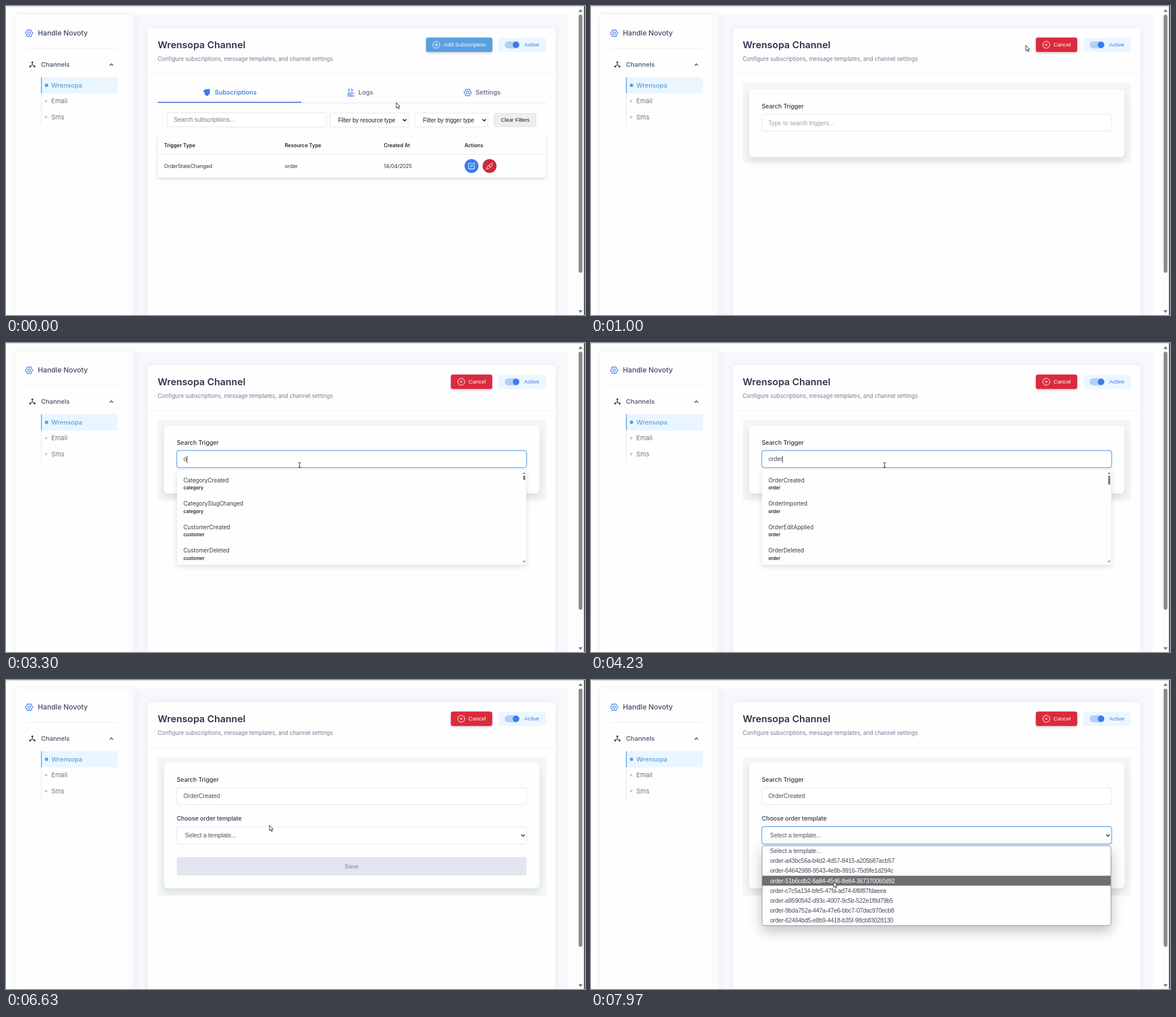
These frames come from a looping animation (1000 px wide and 534 px high, 8 s). An HTML page:

```html
<!DOCTYPE html>
<html lang="en">
<head>
<meta charset="utf-8">
<title>Channel subscriptions</title>
<style>
html, body { margin: 0; width: 100%; height: 100%; overflow: hidden; background: #fefeff; }
svg { display: block; width: 100vw; height: 100vh; }
text { font-family: Inter, sans-serif; white-space: pre; }
text.a { font-family: "Liberation Sans", Arial, sans-serif; }
.soft { filter: drop-shadow(0 0 5px rgba(60, 60, 100, .09)); }
.low { filter: drop-shadow(0 2px 2px rgba(0, 0, 0, .16)); }
.lift { filter: drop-shadow(0 6px 7px rgba(30, 50, 70, .13)); }
.menu { filter: drop-shadow(0 3px 4px rgba(0, 0, 0, .11)); }
.pop { filter: drop-shadow(0 9px 11px rgba(0, 0, 0, .24)); }
</style>
</head>
<body>
<svg id="stage" viewBox="0 0 1000 534" preserveAspectRatio="none"></svg>
<script>
const LOOP = 8000;
const OPEN_FORM = 650, FOCUS = 2230, PICK = 6300, OPEN_SELECT = 7240;
const KEYS = [3250, 3480, 3690, 3880, 4090];
const WORD = 'order';
const BLUE = '#3b7ced', SKY = '#5a9fe0', RED = '#db2a3e', DARK = '#2d3548', GREY = '#6b7488';

// cursor hot spot: time, x, y
const PATH = [
  [0, 674, 167], [80, 674, 167], [560, 757, 66], [800, 751, 68], [1080, 751, 68],
  [1660, 513, 202], [1950, 507, 211], [4350, 507, 211], [4950, 456, 249],
  [6750, 455, 251], [7120, 424, 267], [7440, 424, 267], [7900, 419, 349], [LOOP, 419, 349]
];
const ALL = ['CategoryCreated', 'CategorySlugChanged', 'CustomerCreated', 'CustomerDeleted'];
const ORDERS = ['OrderCreated', 'OrderImported', 'OrderEditApplied', 'OrderDeleted'];
const MIXED = ALL.slice(0, 2).concat(ORDERS.slice(0, 2));
const OPTIONS = ['Select a template...',
  'order-a43bc56a-b4d2-4d57-8415-a205b87acb57', 'order-64642988-9543-4e8b-9916-75d9fe1d294c',
  'order-51b6cdb2-6a84-45d6-8e64-367370060d92', 'order-c7c5a134-bfe5-47fa-ad74-6f6f87fdaeea',
  'order-a9590542-d93c-4007-9c5b-522e1f8d79b5', 'order-9bda752a-447a-47e6-bbc7-07dac970ecb8',
  'order-62464bd5-e8b9-4418-b35f-98cb83028130'];
const ROW = 40.4, ROW_TOP = 223.4, OPT = 17.1, OPT_TOP = 287;

const rect = (x, y, w, h, fill, rx = 0, more = '') =>
  `<rect x="${x}" y="${y}" width="${w}" height="${h}" rx="${rx}" fill="${fill}" ${more}/>`;
const circle = (x, y, r, fill, more = '') =>
  `<circle cx="${x}" cy="${y}" r="${r}" fill="${fill}" ${more}/>`;
const line = (d, color, w = 1, more = '') =>
  `<path d="${d}" fill="none" stroke="${color}" stroke-width="${w}" stroke-linecap="round" stroke-linejoin="round" ${more}/>`;
const fillPath = (d, color, more = '') => `<path d="${d}" fill="${color}" ${more}/>`;
const text = (x, y, s, size, fill, weight = 400, more = '') =>
  `<text x="${x}" y="${y}" font-size="${size}" fill="${fill}" font-weight="${weight}" ${more}>${s}</text>`;
const arial = (x, y, s, size, fill, weight = 400, more = '') =>
  text(x, y, s, size, fill, weight, `class="a" ${more}`);
const group = (id, body, more = '') => `<g id="${id}" ${more}>${body}</g>`;
const box = (x, y, w, h, rx = 3, more = '') =>
  rect(x, y, w, h, '#fff', rx, `stroke="#e3e6ee" ${more}`);
const chevron = (x, y, w = 1.4) => line(`M${x - 2.6} ${y - 1.3}l2.6 2.6 2.6 -2.6`, '#222', w);
const tri = (x, y, s, dir, color) =>
  fillPath(`M${x - s} ${y + dir * s * .6}h${2 * s}l${-s} ${-dir * s * 1.3}z`, color);

function gear(x, y, r, color) {
  let d = '';
  for (let i = 0; i < 6; i++) {
    [[-.3, .78], [-.2, 1], [.2, 1], [.3, .78]].forEach(([o, k]) => {
      const a = (i + .5 + o) * Math.PI / 3;
      d += `${d ? 'L' : 'M'}${(x + Math.sin(a) * r * k).toFixed(2)} ${(y - Math.cos(a) * r * k).toFixed(2)}`;
    });
  }
  return line(d + 'Z', color, 1.1) + circle(x, y, r * .34, 'none', `stroke="${color}" stroke-width="1.1"`);
}

function shell() {
  return rect(0, 0, 1000, 534, '#fefeff')
    + rect(224, 15, 747, 519, '#f8f8fc')
    + rect(16, 15, 207, 540, '#fefeff', 3, 'class="soft"')
    + rect(210, 15, 14, 519, 'url(#edge)')
    + rect(0, 0, 1000, 2.5, 'url(#top)')
    + gear(40, 47, 6.4, BLUE)
    + text(55, 51.4, 'Handle Novoty', 12.2, '#414a5e', 500)
    + rect(33, 72.5, 161, 1, '#eeeff4')
    + line('M45.5 97.5V101.5L41.5 104.5M45.5 101.5L49.5 104.5', '#3f4654', 1.2)
    + circle(45.5, 97.4, 1.7, '#3f4654') + circle(41.7, 104.5, 1.7, '#3f4654') + circle(49.3, 104.5, 1.7, '#3f4654')
    + text(60.5, 105, 'Channels', 11, '#4a5266', 500)
    + line('M179.4 102.6l2.6 -2.6 2.6 2.6', '#333a48', 1.3)
    + rect(60.5, 151, 1, 55, '#e2e4ea')
    + rect(61, 123, 132, 28, '#eaf6ff') + rect(60.5, 123, 1.4, 28, SKY)
    + circle(70, 137, 2.9, SKY) + text(78.3, 141, 'Wrensopa', 11, SKY, 500)
    + circle(69.3, 164.5, 2.2, '#c9ccd6') + text(78.3, 168.2, 'Email', 11, GREY)
    + circle(69.3, 192, 2.2, '#c9ccd6') + text(78.3, 195.9, 'Sms', 11, GREY)
    + rect(245, 38, 704, 520, '#fefeff', 6, 'class="soft"')
    + text(262, 72.8, 'Wrensopa Channel', 16.5, DARK, 600)
    + text(262, 95.4, 'Configure subscriptions, message templates, and channel settings', 9.63, '#737c90')
    + rect(245, 116, 704, 1, '#f1f1f5')
    + rect(850, 55, 82.5, 24.5, '#ecf6fe', 4)
    + rect(861.5, 61, 25.5, 12.3, '#b4d0f5', 6.15) + circle(880.8, 67.1, 5.6, BLUE)
    + arial(895, 70.4, 'Active', 9.63, BLUE)
    + rect(987, 2, 11, 532, '#fcfcfc') + rect(989, 15, 6.6, 446, '#8b8b8b', 3.3)
    + tri(992.3, 8, 3.6, 1, '#757575') + tri(992.3, 528, 3.6, -1, '#757575')
    + rect(998.2, 0, 1.8, 534, '#4c4c4e');
}

function tableView() {
  const add = rect(725.5, 54.5, 114.5, 25, SKY, 3.5, 'class="low"')
    + circle(743.3, 67, 6, 'none', 'stroke="#fff" stroke-width="1"')
    + line('M740.6 67h5.4M743.3 64.3v5.4', '#fff')
    + arial(756, 70.4, 'Add Subscription', 9.63, '#fff');
  const tabs = rect(262, 167, 670.5, 1, '#e3e5eb') + rect(262, 165.6, 248, 1.7, '#3b76d9')
    + fillPath('M340.5 147.5q3 -4.5 8 -3.6l3.2 -.8.4 4.2q.8 4.4 -2.4 6.2l-1.4 2.6 -3 -1.6q-2.8 -1 -2.2 -4.4z', BLUE)
    + text(360.5, 153.4, 'Subscriptions', 11, '#3573dc', 500)
    + line('M593.2 143.6l-2 1.8 2 1.8M596.6 143.6l2 1.8 -2 1.8', BLUE, 1.3)
    + line('M590.4 150.3h10.4M590.4 152.9h7.6M590.4 155.5h10.4', BLUE, 1.3)
    + text(608.7, 153.4, 'Logs', 11, '#5d6679', 500)
    + gear(797.4, 149.6, 6.4, BLUE) + text(811, 153.4, 'Settings', 11, '#5d6679', 500);
  const filters = box(278.5, 184.5, 275, 24.5, 2)
    + arial(289.5, 200.4, 'Search subscriptions...', 10.45, '#757a85')
    + box(559.5, 185, 135, 24, 2) + arial(573.5, 200.5, 'Filter by resource type', 10, '#1d1f24') + chevron(688.5, 197.3, 1.6)
    + box(706.5, 185, 125.5, 24, 2) + arial(720.3, 200.5, 'Filter by trigger type', 10, '#1d1f24') + chevron(826, 197.3, 1.6)
    + rect(843.5, 185.5, 72, 23, '#eeeef0', 2.5, 'stroke="#e2e3e8"')
    + arial(855, 200.2, 'Clear Filters', 9.15, '#1d1f24');
  const cols = [[273, 'Trigger Type', 'OrderStateChanged'], [481.5, 'Resource Type', 'order'],
    [652.5, 'Created At', '14/04/2025'], [792, 'Actions', '']];
  const table = rect(262, 226, 670.5, 71, '#fefeff', 4, 'class="low"')
    + rect(262, 256, 670.5, 1, '#e9ebf0')
    + cols.map(([x, head, cell]) => text(x, 243.8, head, 8.75, '#23272f', 600) + text(x, 280.2, cell, 8.85, '#2c313b')).join('')
    + circle(804, 276.5, 12, BLUE) + circle(835.2, 276.5, 12, '#ce2a3b')
    + line('M804 271.8h-2.8q-2.2 0 -2.2 2.2v5.4q0 2.2 2.2 2.2h5.4q2.2 0 2.2 -2.2v-2.8', '#fff', 1.1)
    + line('M803 277.6l.5 -2.2 4.9 -4.9 1.7 1.7 -4.9 4.9z', '#fff', 1)
    + line('M834 275.5l3 3 2.2 -2.2q1 -1.6 -.3 -2.8t-2.8 -.3zM833 276l-2 2q-1.4 1.6 0 3t3 0l2 -2zM839.4 272.6l1.8 -1.8M830.8 281l-1.8 1.8', '#fff', 1);
  return group('table', add + tabs + filters + table);
}

function formView() {
  const cancel = rect(768.3, 54.5, 71.5, 25, RED, 3.5, 'class="low"')
    + circle(786.3, 67, 6, 'none', 'stroke="#fff" stroke-width="1"')
    + line('M784.4 65.1l3.8 3.8M788.2 65.1l-3.8 3.8', '#fff')
    + arial(798.7, 70.4, 'Cancel', 9.63, '#fff');
  const input = text(295, 176, 'Search Trigger', 10.25, '#2f3747', 500)
    + rect(293.5, 184.5, 607, 32, '#cfe2fb', 5, 'id="glow"')
    + box(295, 186, 604, 29.3, 4, 'id="field"')
    + arial(306.5, 204.3, 'Type to search triggers...', 10.3, '#9ba1ae', 400, 'id="hint"')
    + arial(306.5, 204.3, '', 10.3, '#454c59', 400, 'id="typed"')
    + rect(306.3, 195, .9, 12, '#222', 0, 'id="caret"');
  const chooser = text(295, 243.2, 'Choose order template', 10.25, '#2f3747', 500)
    + rect(293.5, 252, 607, 33, '#cfe2fb', 5, 'id="selGlow"')
    + box(295, 253.5, 604, 29.8, 4, 'id="select"')
    + arial(309.3, 272.3, OPTIONS[0], 10.3, '#4b5260') + chevron(893, 268.8)
    + rect(295, 306, 604, 32, '#e2e7ef', 4)
    + arial(597, 325.5, 'Save', 10.4, '#9aa3b4', 700, 'text-anchor="middle"');
  return group('form', cancel
    + rect(262, 133, 670.5, 139, '#f4f7f8', 3, 'id="back"')
    + group('card', rect(273, 142.6, 648.3, 117.4, '#fefeff', 7, 'id="panel" class="lift"')
      + input + group('chooser', chooser)));
}

function listView() {
  let rows = '';
  for (let i = 0; i < 4; i++) {
    rows += text(306.5, 240.7 + i * ROW, '', 9.63, '#333a47', 400, `id="name${i}"`)
      + text(306.5, 253.3 + i * ROW, '', 7.95, '#23272f', 600, `id="kind${i}"`);
  }
  return group('list', rect(295.3, 218.5, 603.4, 165, '#fefeff', 3, 'class="menu" stroke="#ebedf1" stroke-width=".8"')
    + rect(296, ROW_TOP, 595, ROW, '#f6f7f9', 0, 'id="hover"') + rows
    + tri(895, 224.8, 2.3, 1, '#777') + tri(895, 378, 2.3, -1, '#777')
    + rect(893, 229, 4, 8, '#858585', 2, 'id="thumb"'));
}

function popupView() {
  const items = OPTIONS.map((s, i) => arial(309.3, 299.2 + i * OPT, s, 10.3, '#444b58', 400,
    `id="opt${i}" letter-spacing="${i ? -.2 : .03}"`)).join('');
  return group('popup', rect(295.4, 286.4, 602.6, 138, '#fefeff', 4, 'class="pop" stroke="#85888e" stroke-width=".9"')
    + rect(295.8, OPT_TOP, 601.8, OPT, '#6f6f71', 0, 'id="mark"') + items);
}

function cursors() {
  const ink = 'stroke="#222" stroke-width=".9" stroke-linejoin="round"';
  return group('arrow', fillPath('M0 0V9.4L2.2 7.4 3.7 10.8 5.2 10.1 3.7 6.9H6.6Z', '#fff', ink))
    + group('beam', line('M-2 -4.3Q0 -4.3 0 -3.2Q0 -4.3 2 -4.3M0 -3.2V3.2M-2 4.3Q0 4.3 0 3.2Q0 4.3 2 4.3', '#222', 1))
    + group('hand', fillPath('M-1.2 .6Q0 -1 1.1 .6V4.2Q2.3 3.4 3 4.6Q4.2 4 4.7 5.2Q5.6 5 5.6 6.2V8.6Q5.4 10.4 4.3 12H-.6Q-1.4 10.2 -3.6 7.6Q-3.8 6 -2.2 6.4L-1.2 7.2Z', '#fff', ink));
}

document.getElementById('stage').innerHTML =
  '<defs><linearGradient id="edge"><stop stop-color="#f8f8fb"/><stop offset=".25" stop-color="#fdfdfe"/><stop offset="1" stop-color="#f3f3f8"/></linearGradient>'
  + '<linearGradient id="top" x2="0" y2="1"><stop stop-color="#d6d6da"/><stop offset="1" stop-color="#fefeff"/></linearGradient></defs>'
  + shell() + tableView() + formView() + listView() + popupView() + cursors();

const el = {};
document.querySelectorAll('[id]').forEach(n => { el[n.id] = n; });
const set = (id, key, value) => el[id].setAttribute(key, value);
const show = (id, on) => set(id, 'visibility', on ? 'inherit' : 'hidden');
const write = (id, s) => { if (el[id].textContent !== s) el[id].textContent = s; };
const ramp = (t, a, b) => {
  const p = Math.min(1, Math.max(0, (t - a) / (b - a)));
  return p * p * (3 - 2 * p);
};
const mix = (a, b, p) => `rgb(${a.map((v, i) => Math.round(v + (b[i] - v) * p))})`;

function pointer(t) {
  const i = Math.max(1, PATH.findIndex(k => k[0] > t));
  const [a, ax, ay] = PATH[i - 1], [b, bx, by] = PATH[i];
  const p = ramp(t, a, b);
  return [ax + (bx - ax) * p, ay + (by - ay) * p];
}

function focusRing(field, glow, p) {
  set(field, 'stroke', mix([227, 230, 238], [95, 157, 230], p));
  set(glow, 'opacity', p);
}

function drawList(t, y, count) {
  const open = t >= FOCUS && t < PICK;
  const names = count > 2 ? ORDERS : count === 2 ? MIXED : ALL;
  const over = open && y >= ROW_TOP;
  show('list', open);
  show('hover', over);
  set('hover', 'y', ROW_TOP + Math.floor((y - ROW_TOP) / ROW) * ROW);
  set('thumb', 'height', count > 2 ? 16 : count === 2 ? 12 : 8);
  names.forEach((s, i) => {
    write('name' + i, s);
    write('kind' + i, s.match(/^[A-Z][a-z]+/)[0].toLowerCase());
  });
  return over;
}

function drawPopup(t, y) {
  const at = Math.max(0, Math.floor((y - OPT_TOP) / OPT));
  show('popup', t >= OPEN_SELECT);
  set('mark', 'y', OPT_TOP + at * OPT);
  OPTIONS.forEach((s, i) => set('opt' + i, 'fill', i === at ? '#fff' : '#444b58'));
}

function draw(t) {
  const [x, y] = pointer(t);
  const form = t >= OPEN_FORM, picked = t >= PICK;
  const count = KEYS.filter(k => t >= k).length;
  show('table', !form);
  show('form', form);
  show('chooser', picked);
  set('card', 'transform', `translate(0 ${1.3 * (1 - ramp(t, 1400, 1690))})`);
  set('back', 'height', picked ? 240 : 139);
  set('panel', 'height', picked ? 217.4 : 117.4);

  const typed = picked ? ORDERS[0] : WORD.slice(0, count);
  write('typed', typed);
  show('hint', !typed);
  const since = t - (count ? KEYS[count - 1] : FOCUS);
  show('caret', form && t >= FOCUS && !picked && Math.floor(since / 530) % 2 === 0);
  set('caret', 'x', 306.3 + (typed ? el.typed.getComputedTextLength() : 0));
  focusRing('field', 'glow', ramp(t, FOCUS, FOCUS + 250) * (1 - ramp(t, PICK, PICK + 200)));
  focusRing('select', 'selGlow', ramp(t, OPEN_SELECT, OPEN_SELECT + 200));

  const overRow = drawList(t, y, count);
  drawPopup(t, y);

  const overAdd = !form && x > 725 && y > 54 && y < 80;
  const kind = overRow || overAdd ? 'hand'
    : form && !picked && y > 186 && y < 216 ? 'beam' : 'arrow';
  ['arrow', 'beam', 'hand'].forEach(id => {
    show(id, id === kind);
    set(id, 'transform', `translate(${x} ${y})`);
  });
}

const start = performance.now();
function tick() {
  draw((performance.now() - start) % LOOP);
  requestAnimationFrame(tick);
}
tick();
</script>
</body>
</html>
```
